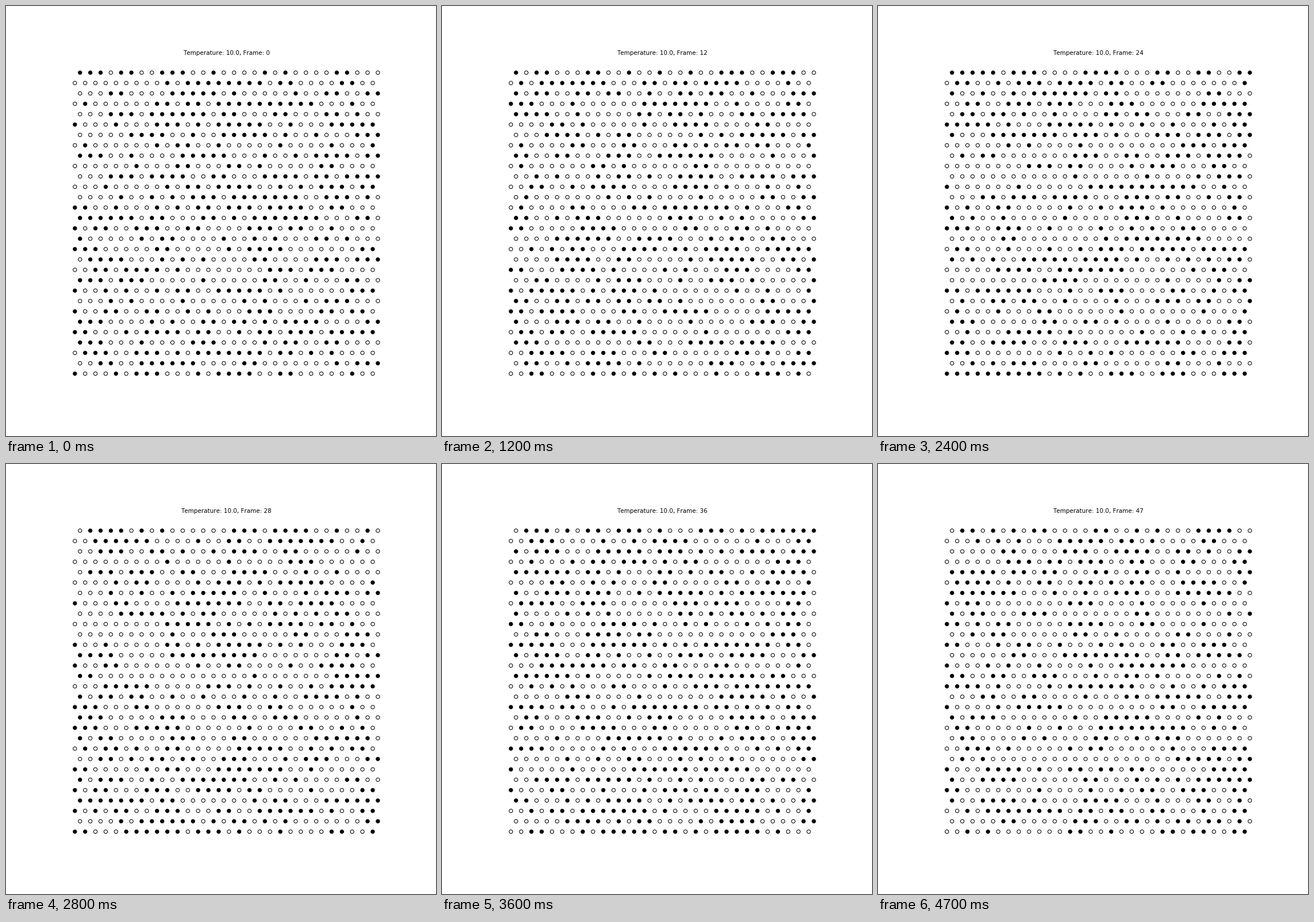
Animation of 748 by 748 pixels, one loop 4800 ms. Source, as a matplotlib script:

```python
import math
import random

import matplotlib.pyplot as plt
import numpy as np
from matplotlib.animation import FuncAnimation

N = 30
FRAMES = 48
TEMPERATURE = 10.0
J_ROW, J_DIAG = 1.6, 0.4      # coupling along a row and between rows
FIELD_MEAN, FIELD_SD = -0.5, 2.0

rng = random.Random(11)


def neighbours(row, col):
    """Sites around (row, col) on the triangular lattice, with couplings."""
    shift = row % 2
    near = [(row, col - 1, J_ROW), (row, col + 1, J_ROW)]
    for r in (row - 1, row + 1):
        near += [(r, col - 1 + shift, J_DIAG), (r, col + shift, J_DIAG)]
    return [(r * N + c, j) for r, c, j in near if 0 <= r < N and 0 <= c < N]


LINKS = [neighbours(r, c) for r in range(N) for c in range(N)]
FIELD = [rng.gauss(FIELD_MEAN, FIELD_SD) for _ in LINKS]


def sweep(spins):
    """One heat-bath pass of as many random updates as there are sites."""
    for _ in LINKS:
        i = rng.randrange(N * N)
        local = FIELD[i] + sum(j * spins[k] for k, j in LINKS[i])
        p_up = 1 / (1 + math.exp(-2 * local / TEMPERATURE))
        spins[i] = 1 if rng.random() < p_up else -1


def simulate():
    spins = [rng.choice((-1, 1)) for _ in LINKS]
    for _ in range(4):
        sweep(spins)
    history = []
    for _ in range(FRAMES):
        history.append(spins.copy())
        sweep(spins)
    return history


states = simulate()

plt.rcParams["text.kerning_factor"] = 6   # whole-pixel kerning in the title
rows, cols = np.divmod(np.arange(N * N), N)
fig, ax = plt.subplots(figsize=(10, 10), dpi=74.8)
ax.axis("off")
dots = ax.scatter(cols + 0.5 * (rows % 2), rows, s=36,
                  facecolors="white", edgecolors="black", linewidths=1)
title = ax.set_title("", fontsize=10, pad=4.6, family="DejaVu Sans")


def update(frame):
    dots.set_facecolor(["black" if s > 0 else "white" for s in states[frame]])
    title.set_text(f"Temperature: {TEMPERATURE}, Frame: {frame}")
    return dots, title


anim = FuncAnimation(fig, update, frames=FRAMES, interval=100,
                     repeat=True, repeat_delay=0)
plt.show()
```
